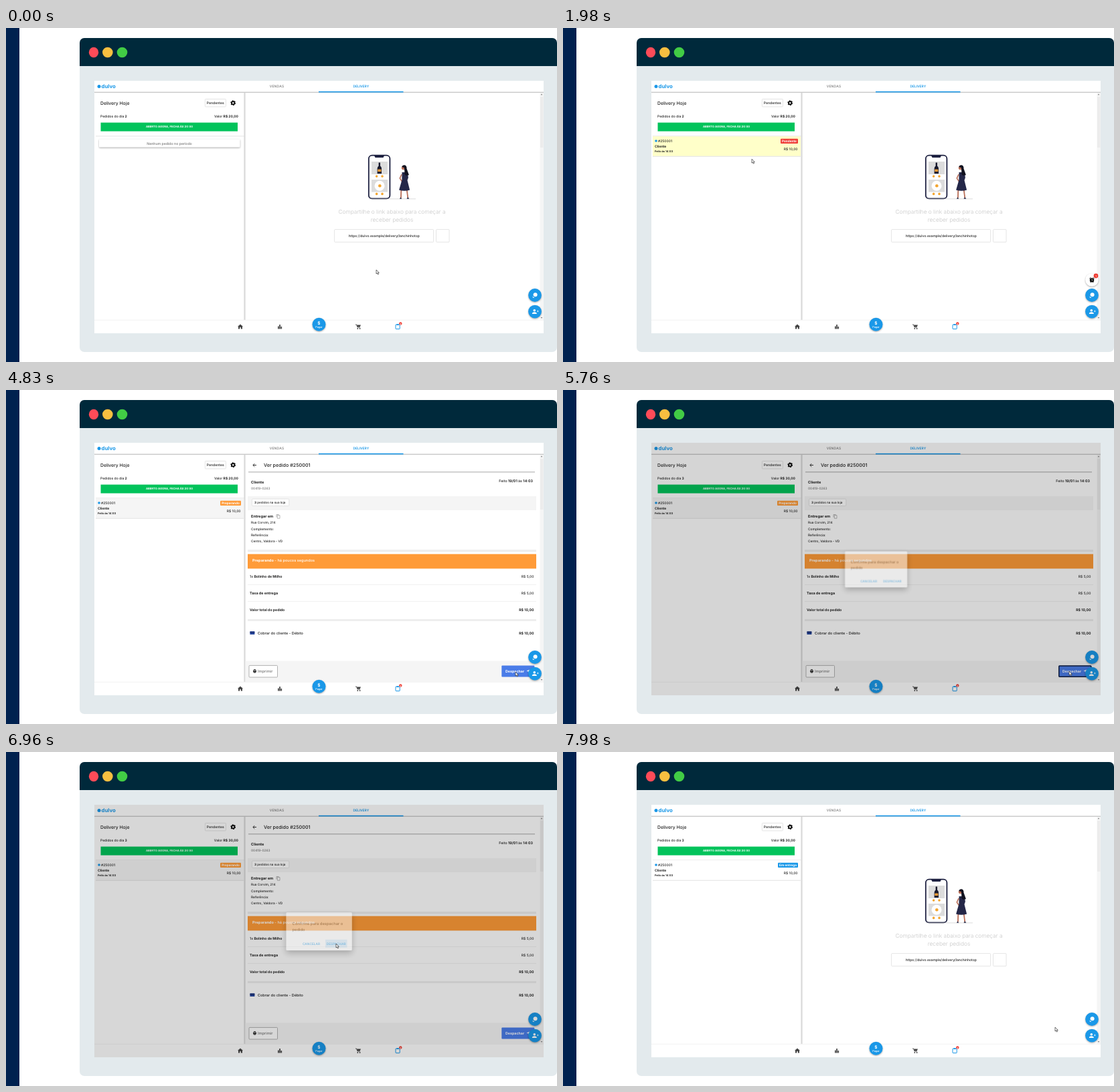
These frames come from a looping animation (823 by 500 pixels, 8 s). An HTML page:

```html
<!DOCTYPE html>
<html lang="pt-BR">
<head>
<meta charset="utf-8">
<title>Delivery</title>
<style>
html, body { margin: 0; width: 100%; height: 100%; overflow: hidden; background: #fff; }
svg { display: block; width: 100%; height: 100%; }
text { font: 500 5px Inter, "Open Sans", sans-serif; fill: #222; text-rendering: geometricPrecision; }
.b { font-weight: 700; }
.w { fill: #fff; }
.g { fill: #777; }
.end { text-anchor: end; }
.mid { text-anchor: middle; }
.blue { fill: #1a98e8; }
.box { fill: #fff; stroke: #ddd; stroke-width: .8; }
.band { fill: #f5f5f5; }
.rule { fill: #eee; }
.ink { fill: #444; }
.line { fill: none; stroke: #222; stroke-width: .9; }
.soft { filter: drop-shadow(0 1px 1px #0005); }

/* One 8 s cycle: 1% is 80 ms */
.k { animation: 8s step-end infinite; }
.none { animation-name: none-yet; }
.row { animation-name: row; }
.rowbg { animation-name: rowbg; }
.empty { animation-name: empty; }
.detail { animation-name: detail; }
.pend { animation-name: pend; }
.prep { animation-name: prep; }
.sent { animation-name: sent; }
.two { animation-name: two; }
.three { animation-name: three; }
.focus { animation-name: focus; }
.hover { animation-name: hover; }
.alarm { animation: alarm 8s infinite; transform-origin: 790px 377px; }
.dim { animation: dim 8s ease-in-out infinite; }
.modal { animation: modal 8s ease-in-out infinite; transform-origin: 467.5px 268.5px; }
.cursor { animation: cursor 8s ease-in-out infinite; }

@keyframes none-yet { 0% { opacity: 1 } 3.75%, 100% { opacity: 0 } }
@keyframes row { 0% { opacity: 0 } 3.75%, 100% { opacity: 1 } }
@keyframes rowbg { 0% { fill: #ffffc9 } 34.125% { fill: #f5f5f5 } 91.875%, 100% { fill: #fff } }
@keyframes empty { 0% { opacity: 1 } 34.5% { opacity: 0 } 91.875%, 100% { opacity: 1 } }
@keyframes detail { 0% { opacity: 0 } 34.5% { opacity: 1 } 91.875%, 100% { opacity: 0 } }
@keyframes pend { 0% { opacity: 1 } 56.625%, 100% { opacity: 0 } }
@keyframes prep { 0% { opacity: 0 } 56.625% { opacity: 1 } 91.875%, 100% { opacity: 0 } }
@keyframes sent { 0% { opacity: 0 } 91.875%, 100% { opacity: 1 } }
@keyframes two { 0% { opacity: 1 } 68.25%, 100% { opacity: 0 } }
@keyframes three { 0% { opacity: 0 } 68.25%, 100% { opacity: 1 } }
@keyframes focus { 0% { opacity: 0 } 70.125% { opacity: 1 } 86%, 100% { opacity: 0 } }
@keyframes hover { 0% { opacity: 0 } 82.5%, 100% { opacity: 1 } }
@keyframes alarm {
  0%, 3.74% { opacity: 0; transform: scale(.3) }
  6.5%, 34.4% { opacity: 1; transform: none }
  34.5%, 100% { opacity: 0; transform: none }
}
@keyframes dim { 0%, 71.05% { opacity: 0 } 72.95%, 86.05% { opacity: .32 } 87.95%, 100% { opacity: 0 } }
@keyframes modal {
  0%, 71.05% { opacity: 0; transform: scale(.89) }
  72.95%, 86.05% { opacity: 1; transform: none }
  87.95%, 100% { opacity: 0; transform: none }
}
@keyframes cursor {
  0%, 14.5% { transform: translate(553px, 362px) }
  24.5% { transform: translate(282px, 196px) }
  26% { transform: translate(281px, 198px) }
  30.5%, 36% { transform: translate(281px, 183px); animation-timing-function: ease-in }
  40.125% { transform: translate(466px, 248px); animation-timing-function: linear }
  43.5% { transform: translate(647px, 327px); animation-timing-function: ease-out }
  53.75%, 56% { transform: translate(758px, 423px) }
  60%, 68% { transform: translate(761px, 422px) }
  70%, 73% { transform: translate(756px, 421px) }
  80% { transform: translate(429px, 293px) }
  83.25%, 90% { transform: translate(493px, 287px) }
  99.5%, 100% { transform: translate(735px, 412px) }
}
</style>
</head>
<body>
<svg viewBox="0 0 823 500" xmlns="http://www.w3.org/2000/svg">
  <rect width="20" height="500" fill="#00214f"/>

  <!-- Browser window -->
  <rect x="110" y="15" width="713" height="470" rx="7" fill="#e3eaed"/>
  <path d="M110 57V22a7 7 0 0 1 7-7H816a7 7 0 0 1 7 7V57Z" fill="#00293b"/>
  <ellipse cx="131" cy="36.5" rx="7.2" ry="7.7" fill="#ff4b58"/>
  <circle cx="151.8" cy="36.5" r="7.8" fill="#f8bf40"/>
  <circle cx="173.5" cy="36.5" r="7.8" fill="#42cc45"/>
  <rect x="132" y="79" width="671" height="378" fill="#fff"/>

  <!-- App header -->
  <circle class="blue" cx="139" cy="87.5" r="2.5"/>
  <text class="blue b" x="142.5" y="90.3" style="font-size:7.8px">dulvo</text>
  <text class="g mid" x="404.5" y="89.3" letter-spacing=".2">VENDAS</text>
  <text class="blue mid" x="530.3" y="89.3" style="font-size:4.9px;font-weight:600">DELIVERY</text>
  <rect x="132" y="95.6" width="671" height="1.4" fill="#c9c9c9"/>
  <rect class="blue" x="467" y="94.8" width="126.5" height="1.6"/>

  <!-- Left panel -->
  <text x="141" y="115" style="font-size:6.8px">Delivery Hoje</text>
  <rect class="box" x="297.4" y="106.4" width="31" height="11.5" rx="1"/>
  <text class="mid" x="312.8" y="113.8" style="font-size:5.1px">Pendentes</text>
  <circle cx="339.2" cy="112.2" r="2.2" fill="none" stroke="#111" stroke-width="1.9"/>
  <circle cx="339.2" cy="112.2" r="3.3" fill="none" stroke="#111" stroke-width="1.2" stroke-dasharray="1.7 1.756"/>
  <g class="k two">
    <text x="141" y="133.8">Pedidos do dia <tspan class="b">2</tspan></text>
    <text class="end" x="347" y="133.8">Valor <tspan class="b">R$ 20,00</tspan></text>
  </g>
  <g class="k three">
    <text x="141" y="133.8">Pedidos do dia <tspan class="b">3</tspan></text>
    <text class="end" x="347" y="133.8">Valor <tspan class="b">R$ 30,00</tspan></text>
  </g>
  <rect x="141.5" y="141.6" width="204.5" height="13" fill="#02c35b"/>
  <text class="w b mid" x="244" y="149.4" style="font-size:4.2px">ABERTO AGORA, FECHA ÀS 20:00</text>
  <rect x="134" y="161.4" width="222" height="1" fill="#e4e4e4"/>

  <g class="k none">
    <rect class="soft" x="139" y="166.5" width="210.5" height="12" rx="1" fill="#fff"/>
    <text class="g mid" x="244" y="174.7" style="font-size:5.2px">Nenhum pedido no período</text>
  </g>
  <g class="k row">
    <rect x="134" y="191.4" width="221" height="1.2" fill="#ddd"/>
    <rect class="k rowbg" x="134" y="162.2" width="221" height="29.4"/>
    <circle class="blue" cx="139" cy="169" r="1.8"/>
    <text x="142" y="171.2">#250001</text>
    <text class="b" x="137" y="178.6">Cliente</text>
    <text class="b" x="137" y="185.8" style="font-size:4px">Feito às 14:03</text>
    <text class="end" x="350.6" y="183.3">R$ 10,00</text>
    <g class="k pend">
      <rect x="325" y="165.7" width="26" height="7.3" rx="1" fill="#f0403a"/>
      <text class="w b mid" x="338" y="171" style="font-size:4.7px">Pendente</text>
    </g>
    <g class="k prep">
      <rect x="320" y="165.7" width="31" height="7.3" rx="1" fill="#ff9b38"/>
      <text class="w b mid" x="335.5" y="171" style="font-size:4.7px">Preparando</text>
    </g>
    <g class="k sent">
      <rect class="blue" x="321" y="165.7" width="30" height="7.3" rx="1"/>
      <text class="w b mid" x="336" y="171" style="font-size:4.7px">Em entrega</text>
    </g>
  </g>

  <!-- Divider and scrollbar -->
  <rect x="355.4" y="97" width="2.2" height="340" fill="#d9d9d9"/>
  <rect class="band" x="797.5" y="97" width="5.5" height="340"/>
  <rect x="798" y="103" width="4.5" height="76" fill="#ececec"/>
  <path d="M798.7 100.2l1.3-1.8 1.3 1.8ZM798.7 433l1.3 1.8 1.3-1.8Z" fill="#777"/>

  <!-- Empty view -->
  <g class="k empty">
    <rect x="541.8" y="190.6" width="31.6" height="64.8" rx="5" fill="#fff" stroke="#1d2040" stroke-width="1.8"/>
    <path d="M550 191h15l-1.5 3h-12Z" fill="#1d2040"/>
    <path d="M546 200h24v19h-24ZM546 227h24v18.5h-24Z" fill="#dcdcdc"/>
    <path d="M556.6 201.5h2.4v5q2 1.5 2 4v7.5h-6.4v-7.5q0-2.5 2-4Z" fill="#17182c"/>
    <rect x="555.2" y="211.5" width="5.2" height="3.6" fill="#e79a36"/>
    <circle cx="558" cy="236.2" r="7.5" fill="#fff"/>
    <g fill="#f3a52f">
      <circle cx="558.3" cy="236.2" r="2.3"/>
      <circle cx="553.6" cy="222" r="1.8"/><circle cx="562" cy="222" r="1.8"/>
      <circle cx="553.6" cy="248.4" r="1.8"/><circle cx="562" cy="248.4" r="1.8"/>
    </g>
    <path d="M542 255.8H612" stroke="#bbb" stroke-width=".5"/>
    <path d="M590.3 241l-.4 13.5M598.6 241l1.7 13.5" stroke="#b96f58" stroke-width="1.8"/>
    <path d="M588 255.7l1.4-2.5 1.8 2.5ZM598.5 255.7l1.8-2.5 2 2.5Z" fill="#1d2040"/>
    <path d="M591 219l-2.7 6 3.4 5" fill="none" stroke="#b96f58" stroke-width="1.6"/>
    <circle cx="593.6" cy="209.5" r="2.8" fill="#b96f58"/>
    <path d="M591.5 216h8.2l1.2 8-1.4 4 3.6 14.5q-8 2.4-16 0l4.3-15Z" fill="#242748"/>
    <path d="M591.3 208q.7-3 4-2.7 3.5.7 3.2 5.2l3.4 9.5q-4.5 1.8-6.4-.8l-.6-10Z" fill="#11121f"/>
    <g class="mid" fill="#c8c8c8">
      <text x="576.5" y="277.6" style="font-size:8.3px;font-weight:300;fill:#c6c6c6">Compartilhe o link abaixo para começar a</text>
      <text x="576.5" y="290" style="font-size:8.4px;font-weight:300;fill:#c6c6c6">receber pedidos</text>
    </g>
    <rect class="box" x="490.6" y="301.6" width="148" height="19" rx="1"/>
    <text class="mid" x="564.8" y="312.9" style="font-size:5px">https://dulvo.example/delivery/lanchinhotop</text>
    <rect class="box" x="642.5" y="301.6" width="19.5" height="19" rx="1"/>
  </g>

  <!-- Order view -->
  <g class="k detail">
    <path class="line" d="M374 112.5H369M371.3 110.1L368.9 112.5 371.3 114.9"/>
    <text x="385" y="115" style="font-size:7.2px">Ver pedido #250001</text>
    <rect x="362" y="122" width="428" height="1.5" fill="#c4c4c4"/>
    <text class="b" x="366" y="139.8" style="font-size:5.6px">Cliente</text>
    <text class="g" x="366" y="148.5" style="font-size:4.8px">00419-0263</text>
    <text class="end" x="787" y="138" style="font-size:5.3px">Feito <tspan class="b">19/01</tspan> às <tspan class="b">14:03</tspan></text>
    <rect class="band" x="361" y="159" width="431" height="21"/>
    <rect class="box" x="367.4" y="163" width="55.4" height="10.6" rx="1.5"/>
    <text x="371" y="170" style="font-size:4.6px"><tspan class="b">3</tspan> pedidos na sua loja</text>
    <text class="b" x="366" y="191" style="font-size:5.6px">Entregar em</text>
    <path d="M404 190.5v-4h3.5M405.3 187.6h3.7v4.6h-3.7Z" fill="none" stroke="#999" stroke-width=".7"/>
    <text x="366" y="200.4" style="font-size:4.7px">Rua Corvim, 214</text>
    <text x="366" y="209.6" style="font-size:4.9px">Complemento:</text>
    <text x="366" y="218.7" style="font-size:4.9px">Referência:</text>
    <text x="366" y="227.9" style="font-size:4.8px">Centro, Valdora - VD</text>
    <rect class="rule" x="361" y="239" width="431" height="3.5"/>

    <g class="k pend">
      <rect x="361" y="245.6" width="431" height="21.8" fill="#e83e2c"/>
      <text class="w" x="368" y="257.2" style="font-size:5.6px"><tspan class="b">Pendente</tspan> - há poucos segundos</text>
    </g>
    <g class="k prep">
      <rect x="361" y="245.6" width="431" height="21.8" fill="#ff9b38"/>
      <text class="w" x="368" y="257.2" style="font-size:5.6px"><tspan class="b">Preparando</tspan> - há poucos segundos</text>
    </g>

    <text x="364" y="280.7" style="font-size:5.2px">1x <tspan class="b">Bolinho de Milho</tspan></text>
    <text class="end" x="788.4" y="280.7">R$ 5,00</text>
    <rect class="rule" x="361" y="291" width="431" height=".8"/>
    <text class="b" x="364" y="305.8" style="font-size:5.4px">Taxa de entrega</text>
    <text class="end" x="788.4" y="305.8">R$ 5,00</text>
    <rect class="rule" x="361" y="316" width="431" height=".8"/>
    <text class="b" x="364" y="331" style="font-size:5.2px">Valor total do pedido</text>
    <text class="end b" x="788.4" y="331" style="font-size:5.2px">R$ 10,00</text>
    <rect class="rule" x="361" y="343" width="431" height="3"/>
    <rect x="364.4" y="361.2" width="7" height="4.8" rx=".5" fill="#24449a"/>
    <rect x="364.4" y="362.2" width="7" height="1" fill="#14225a"/>
    <text x="376" y="365.6" style="font-size:5.5px">Cobrar do cliente - Débito</text>
    <text class="end b" x="788.4" y="365.6" style="font-size:5.2px">R$ 10,00</text>
    <rect class="band" x="357.6" y="405.5" width="440" height="31.5"/>

    <g class="k pend">
      <rect x="701.5" y="413.4" width="41.5" height="16.6" rx="1" fill="#fff" stroke="#e06a5c" stroke-width=".9"/>
      <text class="b mid" x="722.2" y="423.6" style="font-size:5.5px;fill:#e23c2c">Recusar</text>
      <rect x="750" y="413" width="39.5" height="17.3" rx="1" fill="#15c474"/>
      <text class="w b" x="758.5" y="423.6" style="font-size:5.5px">Aceitar</text>
    </g>
    <g class="k prep">
      <rect x="363" y="412.4" width="42.5" height="17.6" rx="1" fill="#fff" stroke="#aaa" stroke-width=".9"/>
      <path class="ink" d="M369 419.5h5v3h-1v1h-3v-1h-1ZM370 418h3v1h-3Z"/>
      <text class="g" x="376" y="423.4" style="font-size:5.7px">Imprimir</text>
      <rect x="740.3" y="412.4" width="49" height="17.2" rx="1" fill="#4a7ce8"/>
      <rect class="k focus" x="740.8" y="412.9" width="48" height="16.4" rx="1" fill="none" stroke="#14203f" stroke-width="1.5"/>
      <text class="w b" x="746" y="423.2" style="font-size:5.3px">Despachar</text>
      <path class="w" d="M777.5 420.6l5-2-1.7 4.6-1-1.9Z"/>
    </g>
  </g>

  <!-- Bottom bar -->
  <rect x="132" y="437" width="671" height="20" fill="#fff"/>
  <rect class="rule" x="132" y="436.8" width="671" height=".8"/>
  <path class="ink" d="M350 443.4l4 3.6h-1v3.6h-2.2V448h-1.6v2.6H347V447h-1Z"/>
  <path class="ink" d="M406 446.5h1.7v4H406ZM408.2 444h1.7v6.5h-1.7ZM410.4 447h1.7v3.5h-1.7Z"/>
  <circle class="blue soft" cx="467.5" cy="443.7" r="10"/>
  <text class="w b mid" x="467.5" y="443.7" style="font-size:6.5px">$</text>
  <text class="w mid" x="467.5" y="448.5" style="font-size:3.8px">Pagar</text>
  <path class="line" d="M522 444h1.5l1.5 4h4" style="stroke:#444"/>
  <path class="ink" d="M524 444.5h6l-1.4 3h-3.6Z"/>
  <circle class="ink" cx="525.3" cy="450" r=".9"/><circle class="ink" cx="528.6" cy="450" r=".9"/>
  <rect x="582" y="444" width="6.2" height="6.6" rx=".6" fill="none" stroke="#1a98e8" stroke-width="1"/>
  <rect class="blue" x="583.5" y="443.2" width="3.2" height="1.8"/>
  <circle cx="589.3" cy="442.4" r="2.2" fill="#ee3c32"/>
  <text class="w mid b" x="589.3" y="443.5" style="font-size:3px">4</text>

  <!-- Floating buttons -->
  <g class="alarm">
    <circle class="soft" cx="790" cy="377" r="9.8" fill="#fff"/>
    <circle cx="790" cy="377.4" r="3.2" fill="#111"/>
    <path d="M786.4 375.2l2-1.8M793.6 375.2l-2-1.8M787.6 381l1-1M792.4 381l-1-1" stroke="#111"/>
    <path d="M790 375.8v1.8h1.3" fill="none" stroke="#fff" stroke-width=".6"/>
    <circle cx="796" cy="371" r="3.4" fill="#ee3c32"/>
    <text class="w mid" x="796" y="372.5" style="font-size:4px">1</text>
  </g>
  <circle class="blue soft" cx="790" cy="400" r="9.9"/>
  <circle class="w" cx="790.6" cy="399.2" r="3"/>
  <path d="M786.6 400a3.2 3.2 0 0 0 4 3.4l-3.7.6Z" class="w"/>
  <circle class="blue soft" cx="790" cy="424.6" r="9.9"/>
  <circle class="w" cx="789.3" cy="422.8" r="1.8"/>
  <path class="w" d="M785.8 428q0-2.8 3.5-2.8t3.5 2.8Z"/>
  <path d="M793 424h2.6M794.3 422.7v2.6" stroke="#fff" stroke-width=".7"/>

  <!-- Confirmation -->
  <rect class="dim" x="132" y="79" width="671" height="378"/>
  <g class="modal">
    <rect x="418.4" y="240" width="98.4" height="57" rx="1.5" fill="#fff" style="filter:drop-shadow(0 4px 5px #0007)"/>
    <text class="g" x="427.5" y="259" style="font-size:5.8px">Confirme para despachar o</text>
    <text class="g" x="427.5" y="267.6" style="font-size:5.8px">pedido</text>
    <rect class="k hover" x="477" y="280.8" width="32.5" height="12" fill="#d3ebfb"/>
    <text class="blue mid" x="456" y="288.6" style="font-size:4.8px">CANCELAR</text>
    <text class="blue mid" x="493.2" y="288.6" style="font-size:4.8px">DESPACHAR</text>
  </g>

  <path class="cursor" d="M0 0V6L1.4 4.8 2.4 7 3.5 6.5 2.5 4.4H4.3Z" fill="#fff" stroke="#333" stroke-width=".7"/>
</svg>
</body>
</html>
```
